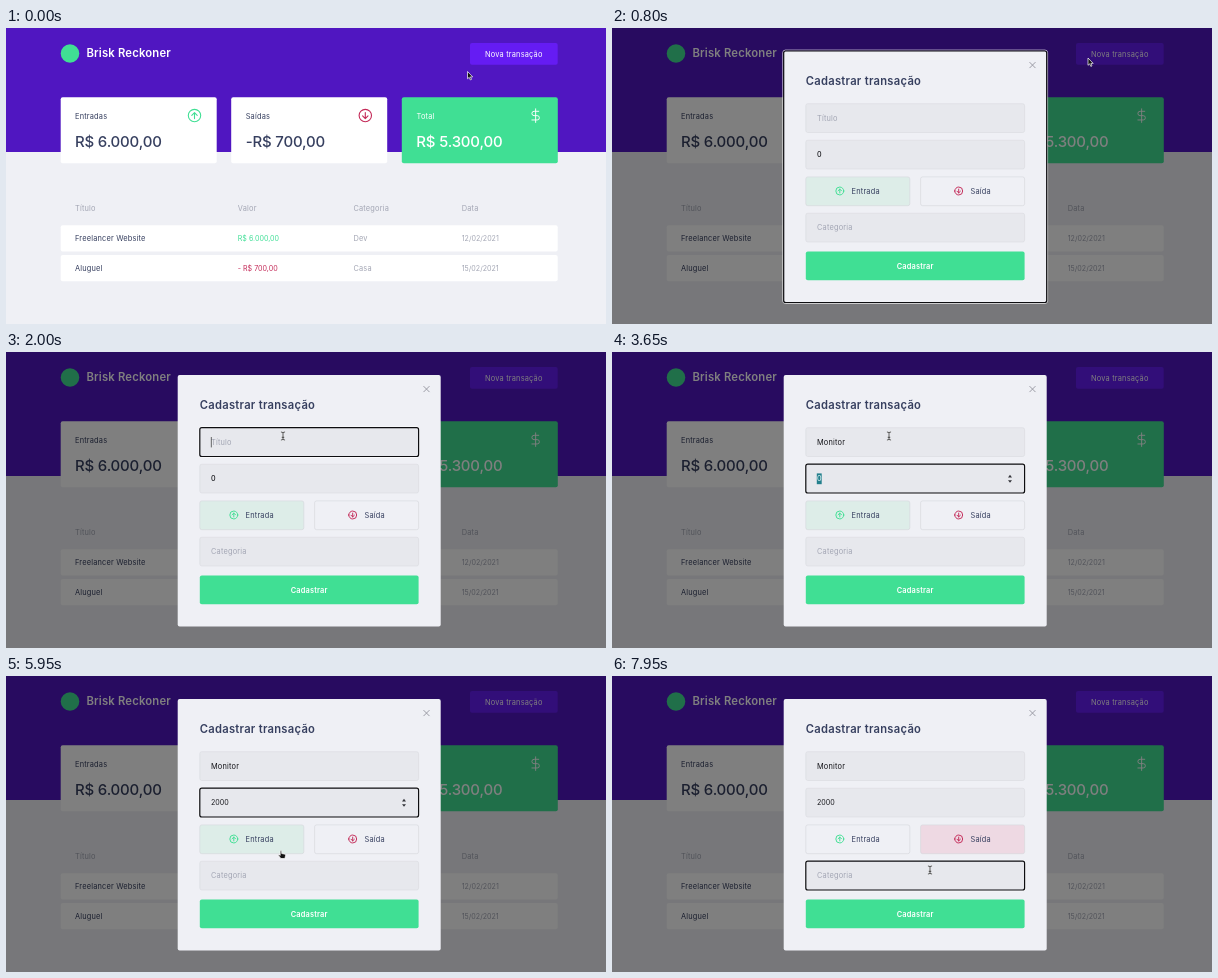
An HTML page for the animation above (8000 ms loop, 600 px wide and 296 px high).

```html
<!DOCTYPE html>
<html lang="pt-BR">
<head>
<meta charset="utf-8">
<title>Transações</title>
<style>
html, body { margin: 0; width: 100%; height: 100%; overflow: hidden; background: #eff0f5; }
svg { display: block; width: 100%; height: 100%; }
text { font: 400 7.4px Inter, sans-serif; letter-spacing: .025em; fill: #363f5f; white-space: pre; }
.num { font-size: 7.1px; letter-spacing: 0; }
.big { font-size: 15px; font-weight: 500; letter-spacing: -.012em; }
.brand { font-size: 11.3px; font-weight: 600; letter-spacing: .015em; }
.title { font-size: 11.2px; font-weight: 600; }
.white { fill: #fff; }
.grey { fill: #a3a6b4; }
.green { fill: #40df97; }
.red { fill: #c42a58; }
.mid { text-anchor: middle; }
.bold { font-weight: 600; }
.typed { fill: #17171c; }
.field { fill: #e7e8ed; stroke: #d5d6db; stroke-width: .5; }
.choice { stroke: #d3d5da; stroke-width: .6; }
.icon { fill: none; stroke-linecap: round; stroke-linejoin: round; }
.cursor { stroke: #fff; stroke-width: .7; stroke-linejoin: round; fill: #111; }
</style>
</head>
<body>
<svg viewBox="0 0 600 296" preserveAspectRatio="none">
  <defs>
    <g id="up" class="icon">
      <circle r="6.2"/>
      <path d="M0 3V-3M-2.7 -.3L0 -3L2.7 -.3"/>
    </g>
  </defs>

  <rect width="600" height="296" fill="#eff0f5"/>
  <rect width="600" height="124" fill="#5016c1"/>
  <circle cx="64" cy="25.5" r="9.3" fill="#40df94"/>
  <text class="brand white" x="80.5" y="29.3">Brisk Reckoner</text>
  <rect id="open" x="464" y="15" width="87.7" height="21.7" rx="2"/>
  <text class="white mid" x="507.8" y="28.5">Nova transação</text>

  <rect x="54.7" y="69.3" width="156" height="66" rx="2" fill="#fff"/>
  <rect x="225.2" y="69.3" width="156" height="66" rx="2" fill="#fff"/>
  <rect x="395.8" y="69.3" width="156" height="66" rx="2" fill="#40df94"/>
  <text x="69" y="90.5">Entradas</text>
  <text x="239.7" y="90.5">Saídas</text>
  <text class="white" x="410.5" y="90.5">Total</text>
  <text class="big" x="69" y="118.6">R$ 6.000,00</text>
  <text class="big" x="239.7" y="118.6">-R$ 700,00</text>
  <text class="big white" x="410.3" y="118.6">R$ 5.300,00</text>
  <use href="#up" transform="translate(188.5 87.6)" stroke="#40df94" stroke-width="1.1"/>
  <use href="#up" transform="translate(359.3 87.6) rotate(180)" stroke="#c42a58" stroke-width="1.1"/>
  <path class="icon" transform="translate(522.2 80.2) scale(.62)" stroke="#fff" stroke-width="1.5"
    d="M12 1v22M17 5H9.5a3.5 3.5 0 0 0 0 7h5a3.5 3.5 0 0 1 0 7H6"/>

  <g class="head">
    <text class="grey" x="69" y="183.3">Título</text>
    <text class="grey" x="231.8" y="183.3">Valor</text>
    <text class="grey" x="347.4" y="183.3">Categoria</text>
    <text class="grey" x="455.7" y="183.3">Data</text>
  </g>
  <rect x="54.7" y="197.3" width="497" height="26.2" rx="2" fill="#fff"/>
  <rect x="54.7" y="227" width="497" height="26.2" rx="2" fill="#fff"/>
  <text x="69" y="213">Freelancer Website</text>
  <text class="num green" x="231.8" y="213">R$ 6.000,00</text>
  <text class="grey" x="347.4" y="213">Dev</text>
  <text class="num grey" x="455.7" y="213">12/02/2021</text>
  <text x="69" y="242.7">Aluguel</text>
  <text class="num red" x="231.8" y="242.7">- R$ 700,00</text>
  <text class="grey" x="347.4" y="242.7">Casa</text>
  <text class="num grey" x="455.7" y="242.7">15/02/2021</text>

  <g id="modal">
    <rect width="600" height="296" opacity=".5"/>
    <rect x="171.7" y="23" width="263" height="251.5" rx="2" fill="#eff0f5"/>
    <path class="icon" d="M417.8 34.4l5.4 5.4m0 -5.4l-5.4 5.4" stroke="#92929c" stroke-width=".9"/>
    <text class="title" x="193.7" y="56.6">Cadastrar transação</text>
    <rect class="field" x="193.8" y="75.7" width="218.8" height="28.8" rx="2"/>
    <rect class="field" x="193.8" y="112.2" width="218.8" height="28.8" rx="2"/>
    <rect class="choice" id="income" x="193.8" y="148.9" width="104" height="28.8" rx="2"/>
    <rect class="choice" id="expense" x="308.6" y="148.9" width="104" height="28.8" rx="2"/>
    <rect class="field" x="193.8" y="185.2" width="218.8" height="28.8" rx="2"/>
    <rect x="193.8" y="223.5" width="218.8" height="28.8" rx="2" fill="#40df94"/>
    <use href="#up" transform="translate(227.8 163) scale(.64)" stroke="#40df94" stroke-width="1.5"/>
    <use href="#up" transform="translate(346.7 163) rotate(180) scale(.64)" stroke="#c42a58" stroke-width="1.5"/>
    <text x="239.6" y="165.8">Entrada</text>
    <text x="358.5" y="165.8">Saída</text>
    <text class="white bold mid" x="303.2" y="240.6">Cadastrar</text>
    <rect id="mark" x="204.8" y="121.4" width="4.9" height="10.8" fill="#237f8c"/>
    <text id="name" x="205" y="92.8"></text>
    <text id="value" class="num typed" x="205" y="129.3"></text>
    <text class="grey" x="205" y="202.4">Categoria</text>
    <path id="spin" d="M396 125.4l2 -2.6l2 2.6zM396 128.2l2 2.6l2 -2.6z" fill="#34343a"/>
    <rect id="caret" width=".6" height="10.4" fill="#111"/>
  </g>

  <g id="ring" fill="none">
    <rect id="halo" rx="2.6" stroke="#fff" stroke-width=".7"/>
    <rect id="line" rx="2" stroke="#0d0d10" stroke-width="1.2"/>
  </g>

  <g id="pointer">
    <path id="arrow" class="cursor" d="M0 0V7.3L1.7 5.8L2.8 8.4L4 7.9L2.9 5.4H5.2Z"/>
    <path id="hand" class="cursor" d="M-.8 .4Q0 -.5 .7 .4V3L4 3.7Q4.7 4 4.6 4.8L3.9 8H-.1L-2.6 4.9Q-2.4 3.9 -1.4 4.5L-.8 5Z"/>
    <g id="beam" class="icon">
      <path d="M-1.7 -4Q0 -4 0 -3Q0 -4 1.7 -4M0 -3V3M-1.7 4Q0 4 0 3Q0 4 1.7 4M-.9 1.3H.9" stroke="#fff" stroke-width="1.5" opacity=".6"/>
      <path d="M-1.7 -4Q0 -4 0 -3Q0 -4 1.7 -4M0 -3V3M-1.7 4Q0 4 0 3Q0 4 1.7 4M-.9 1.3H.9" stroke="#222" stroke-width=".75"/>
    </g>
  </g>
</svg>
<script>
const LOOP = 8000, TICK = 50;
const $ = id => document.getElementById(id);
const show = (id, on) => { $(id).style.display = on ? '' : 'none'; };
const set = (id, attrs) => { for (const k in attrs) $(id).setAttribute(k, attrs[k]); };

// x, y, width, height
const box = {
  open: [464, 15, 87.7, 21.7],
  modal: [171.7, 23, 263, 251.5],
  name: [193.8, 75.7, 218.8, 28.8],
  value: [193.8, 112.2, 218.8, 28.8],
  income: [193.8, 148.9, 104, 28.8],
  expense: [308.6, 148.9, 104, 28.8],
  category: [193.8, 185.2, 218.8, 28.8],
  submit: [193.8, 223.5, 218.8, 28.8]
};

// time, x, y of the pointer's hot spot
const path = [
  [0, 461.5, 43.5], [600, 479, 30], [750, 479, 30], [800, 476, 30], [880, 475, 30],
  [1600, 277, 84], [5450, 277, 84], [5950, 275, 174.5], [6300, 346, 166],
  [6600, 346, 166], [7000, 318, 192], [7200, 318, 194], [LOOP, 318, 194]
];

const focusSteps = [
  [0, ''], [700, 'open'], [800, 'modal'], [1700, 'name'],
  [3550, 'value'], [6450, 'expense'], [7000, 'category']
];
const caretOn = [[1700, 2300], [2450, 3400], [4150, 4950], [5500, 5950], [7000, 7650]];
const nameKeys = [2450, 2550, 2600, 2700, 2750, 2850, 2900];
const valueKeys = [4150, 4300, 4400, 4450];

const latest = (steps, t) => steps.filter(s => s[0] <= t).pop()[1];
const typed = (word, keys, t) => word.slice(0, keys.filter(k => k <= t).length);
const inside = ([bx, by, w, h], x, y) => x >= bx && x <= bx + w && y >= by && y <= by + h;

function pointerAt(t) {
  const i = path.findIndex(p => p[0] > t);
  const [t0, x0, y0] = path[i - 1], [t1, x1, y1] = path[i];
  const u = (t - t0) / (t1 - t0), e = u * u * (3 - 2 * u);
  return [x0 + (x1 - x0) * e, y0 + (y1 - y0) * e];
}

function outline(id, [x, y, w, h], pad) {
  set(id, { x: x - pad, y: y - pad, width: w + 2 * pad, height: h + 2 * pad });
}

function drawForm(t, focus) {
  const name = typed('Monitor', nameKeys, t);
  const value = typed('2000', valueKeys, t);
  const selected = focus === 'value' && !value;
  const paid = t >= 6450;

  $('name').textContent = name || 'Título';
  set('name', { class: name ? 'typed' : 'grey' });
  $('value').textContent = value || '0';
  $('value').style.fill = selected ? '#d5eef0' : '';
  $('value').style.fontWeight = value ? 400 : 500;
  show('mark', selected);
  show('spin', focus === 'value');
  set('income', { fill: paid ? '#eff0f5' : '#ddede8' });
  set('expense', { fill: paid ? '#eed9e3' : '#eff0f5' });

  const blink = caretOn.some(([a, b]) => t >= a && t < b);
  show('caret', blink);
  if (blink) {
    const text = { name, value }[focus] || '';
    const width = text ? $(focus).getComputedTextLength() : 0;
    set('caret', { x: 204.9 + width, y: box[focus][1] + 9.3 });
  }
}

function drawPointer(x, y, modal) {
  const over = names => names.some(n => inside(box[n], x, y));
  const hand = over(modal ? ['income', 'expense', 'submit'] : ['open']);
  const beam = modal && over(['name', 'value', 'category']);
  show('hand', hand);
  show('beam', beam);
  show('arrow', !hand && !beam);
  set('pointer', { transform: `translate(${x} ${y})` });
  set('open', { fill: hand && !modal ? '#5a18da' : '#651cf3' });
}

function draw(t) {
  const focus = latest(focusSteps, t);
  const modal = t >= 800;
  show('modal', modal);
  show('ring', focus);
  if (focus) {
    outline('line', box[focus], 0);
    outline('halo', box[focus], .9);
  }
  drawForm(t, focus);
  drawPointer(...pointerAt(t), modal);
}

const start = performance.now();
function loop() {
  const t = (performance.now() - start) % LOOP;
  draw(Math.floor(t / TICK) * TICK);
  requestAnimationFrame(loop);
}
loop();
</script>
</body>
</html>
```
